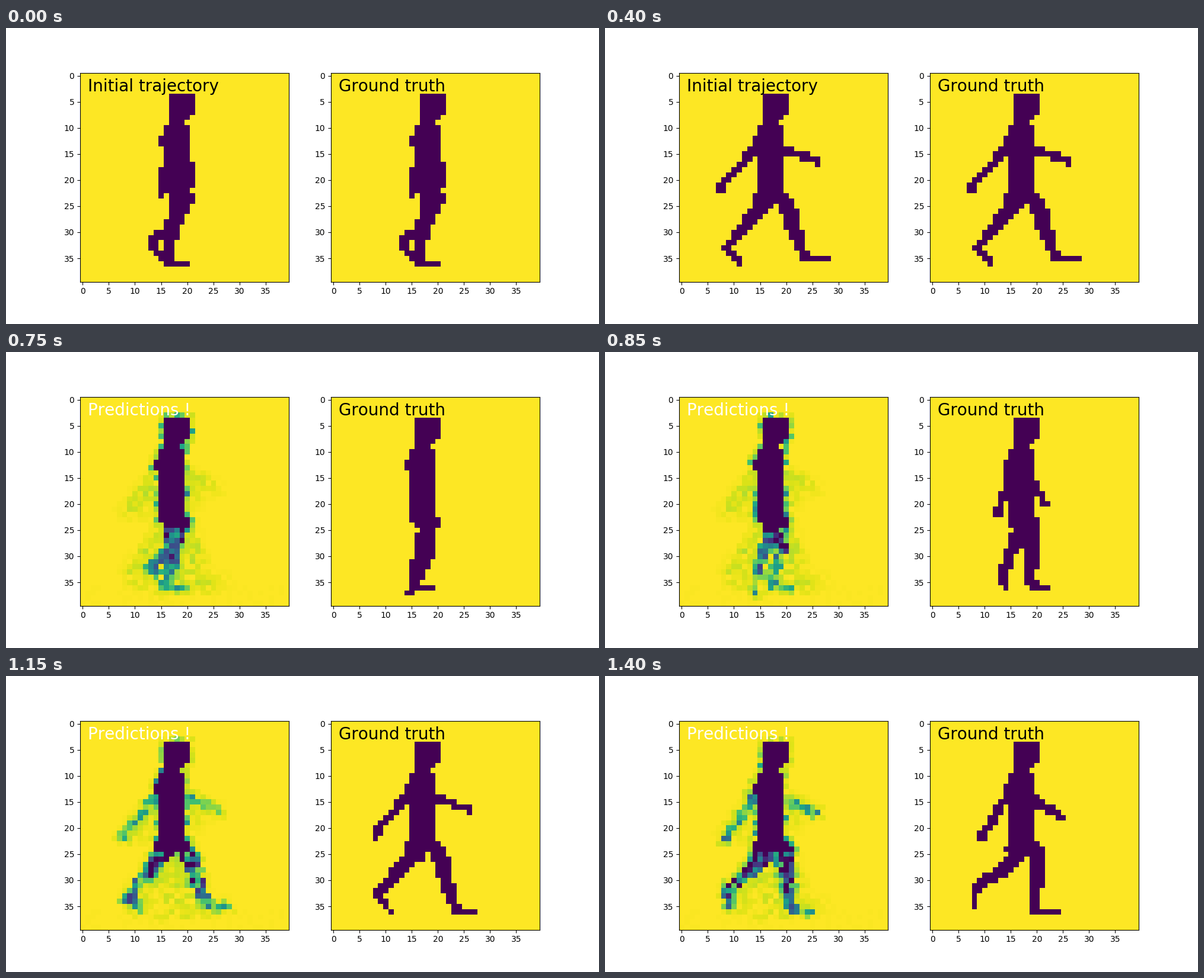
A matplotlib script for the animation above (1450 ms loop, 1000 px wide and 500 px high).

```python
import numpy as np
import matplotlib.pyplot as plt
from matplotlib.animation import FuncAnimation

N = 40
STEP = 50
FRAMES = 29
PREDICT_FROM = 750
GUESS_LAG = 0.06

# Progress through the walk, one unit per step
TIMES = np.array([0, 150, 200, 250, 400, 600, 750, 950, 1150, 1400])
PHASES = np.array([-0.05, 0.12, 0.27, 0.4, 0.5, 0.88, 1, 1.25, 1.55, 1.72])

# Knee, ankle and toe through one step: passing, opening, contact, push-off,
# lift, gathering, feet together
LEG_PHASES = (0, 0.25, 0.4, 0.55, 0.72, 0.88, 0.95)
TRAILING = np.array([
    [(16.5, 29.5), (15, 34), (14.5, 37)],
    [(13.5, 28.5), (11.5, 34), (14, 36)],
    [(12.5, 29), (9, 34), (12, 36)],
    [(12.5, 28), (8.3, 33), (11, 36)],
    [(14.5, 27.5), (8.5, 31), (8, 35)],
    [(17.5, 28.3), (11.8, 31.2), (12.5, 36)],
    [(17, 29), (13, 32), (16, 36)]])
LEADING = np.array([
    [(18.5, 28), (15.5, 35.6), (19, 36)],
    [(20, 30), (22, 35.5), (25, 36)],
    [(22, 29), (24, 34), (29, 34)],
    [(21.3, 29.5), (23.5, 35.6), (27, 36)],
    [(20, 30), (19.5, 35.7), (24, 36)],
    [(18.5, 28), (17.5, 35.7), (22, 36)],
    [(17, 30), (16.5, 35.7), (20, 36)]])
LEG_RADII = (1.7, 1.3, 0.85, 0.5)

ROWS, COLS = np.mgrid[:N, :N]


def phase_at(t):
    if t < PREDICT_FROM:
        return PHASES[TIMES <= t][-1]
    return np.interp(t, TIMES, PHASES)


def drift_at(t):
    return -round(min(t / 500, 1))


def limb(points, radii):
    """Fill a chain of tapered segments."""
    mask = np.zeros((N, N), bool)
    for (x0, y0), (x1, y1), r0, r1 in zip(points, points[1:], radii, radii[1:]):
        dx, dy = x1 - x0, y1 - y0
        s = ((COLS - x0) * dx + (ROWS - y0) * dy) / (dx * dx + dy * dy)
        s = np.clip(s, 0, 1)
        distance = np.hypot(COLS - x0 - s * dx, ROWS - y0 - s * dy)
        mask |= distance <= r0 + (r1 - r0) * s
    return mask


def leg(joints, hip, phase):
    columns = joints.reshape(len(joints), -1).T
    chain = [np.interp(phase % 1, LEG_PHASES, c, period=1) for c in columns]
    return limb([hip, *np.reshape(chain, (-1, 2))], LEG_RADII)


def walker(phase, drift):
    """Masks of body, arms and legs."""
    swing = np.sin(np.pi * (phase % 1))
    left = np.interp(ROWS, (9, 12, 15, 20, 24), (17, 15, 16, 16, 17 - 2 * swing))
    right = np.interp(ROWS, (7, 9, 11, 20, 24), (21, 19, 20, 20, 21))
    x = COLS - drift
    body = (ROWS >= 4) & (ROWS <= 24) & (x >= np.rint(left)) & (x <= np.rint(right))

    back_arm = [(16.5 + drift, 12), (16.5 + drift - 8 * swing, 22.5 - swing)]
    front_arm = [(19 + drift, 13), (19.8 + drift + 2 * swing, 17 - 2.3 * swing),
                 (19.5 + drift + 8 * swing, 22 - 5.5 * swing)]
    arms = limb(back_arm, (0.9, 0.75)) | limb(front_arm, (0.9, 0.85, 0.65))

    hip, spread = 18.4 + drift / 2, 2.3 * swing
    legs = (leg(TRAILING, (hip - spread, 25), phase)
            | leg(LEADING, (hip + spread, 25), phase))
    return body, arms, legs


def truth(t):
    return np.any(walker(phase_at(t), drift_at(t)), axis=0)


def blur(image):
    return np.mean([np.roll(image, (dy, dx), (0, 1))
                    for dy in (-1, 0, 1) for dx in (-1, 0, 1)], axis=0)


# Faint average of the whole step, unevenly remembered
GRAIN = np.random.default_rng(4).random((N, N))
AVERAGE = np.mean([np.any(walker(p, -1), axis=0) for p in np.linspace(0, 1, 9)], axis=0)
GHOST = np.minimum(0.4 * blur(AVERAGE), 0.12) * GRAIN
GHOST[36:] += 0.006 * GRAIN[36:]


def prediction(t):
    noise, fuzz = np.random.default_rng(t).random((2, N, N))
    body, arms, legs = walker(phase_at(t) - GUESS_LAG, drift_at(t))
    certainty = (t - PREDICT_FROM) / (FRAMES * STEP - PREDICT_FROM)
    fade = np.interp(ROWS, (25, 29, 36), (1.7, 1.2, 0.7)) * (0.7 + 0.35 * certainty)
    limbs = np.maximum(legs * fade, arms * (0.25 + 0.4 * certainty))
    figure = np.clip(np.maximum(body, limbs * (0.15 + 0.95 * noise)), 0, 1)
    halo = 1.5 * blur(figure) * fuzz ** 3
    return np.clip(np.max([figure, halo, GHOST], axis=0), 0, 1)


plt.rcParams["text.kerning_factor"] = 6
fig, axes = plt.subplots(1, 2, figsize=(10, 5), dpi=100)
images = [ax.imshow(np.ones((N, N)), cmap="viridis", vmin=0, vmax=1,
                    interpolation="nearest") for ax in axes]
caption = axes[0].text(1, 3, "", fontsize=20)
axes[1].text(1, 3, "Ground truth", fontsize=20, color="black")


def draw(frame):
    t = frame * STEP
    actual = truth(t)
    predicting = t >= PREDICT_FROM
    images[0].set_data(1 - (prediction(t) if predicting else actual.astype(float)))
    images[1].set_data(1 - actual.astype(float))
    caption.set_text("Predictions !" if predicting else "Initial trajectory")
    caption.set_color("white" if predicting else "black")
    return [*images, caption]


animation = FuncAnimation(fig, draw, frames=FRAMES, interval=STEP, repeat=True)
plt.show()
```
